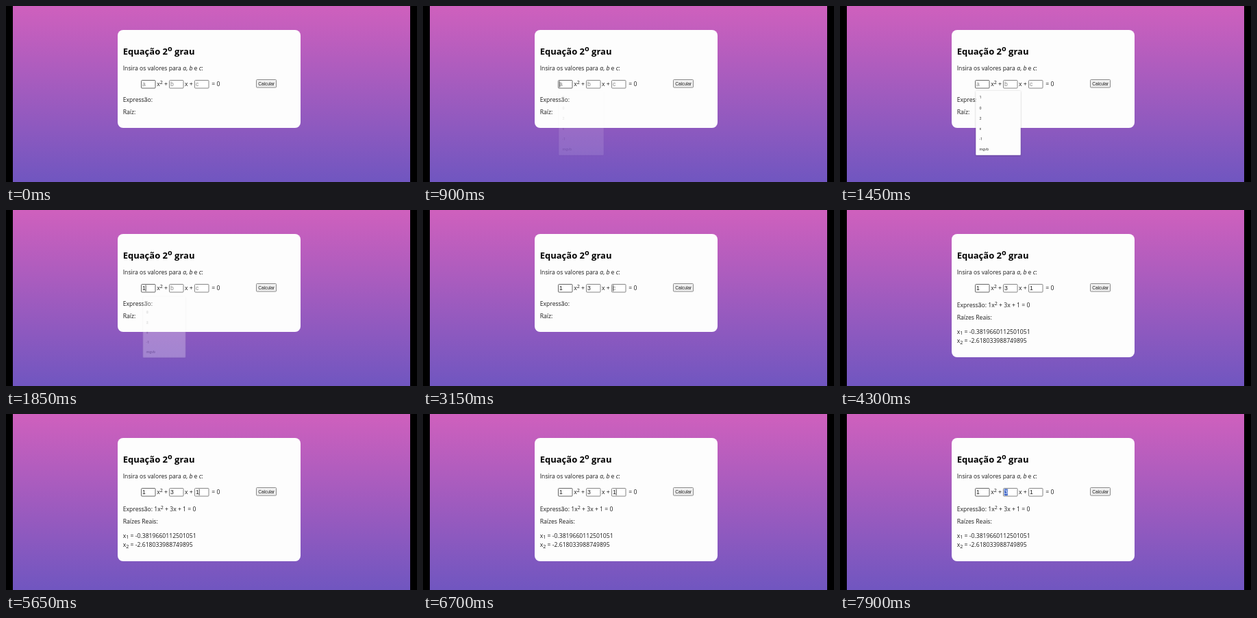
Animation, 600 px wide and 257 px high, one loop 8000 ms. Source, as an HTML page:

```html
<!DOCTYPE html>
<html lang="pt">
<head>
<meta charset="utf-8">
<title>Equação 2º grau</title>
<style>
html, body { margin: 0; width: 100%; height: 100%; overflow: hidden; background: #000; }
svg { display: block; width: 600px; height: 257px; }
text { font: 8.65px "Open Sans", "Noto Sans", sans-serif; fill: #1c1c1c; white-space: pre; }
.title { font-size: 13px; font-weight: 700; fill: #000; }
.sup { font-size: .833em; }
.i { font-style: italic; }
.field rect { fill: #fff; stroke: #858585; stroke-width: 1; }
.field text { font: 8.6px "Liberation Sans", Arial, sans-serif; }
.field .hint { fill: #858585; }
.btn { font: 6.5px "Liberation Sans", Arial, sans-serif; }
.menu text { font: 5.4px Roboto, sans-serif; fill: #333; }

/* Timeline: 8 s, hard cuts unless eased */
.show, .hide, .card, .caret, .sel { animation: 8s step-end infinite; }
.a { --d: 0s; }
.show { opacity: 0; }
.show.a { animation-name: showA; }
.hide.a { animation-name: hideA; }
.show.b { animation-name: showB; }
.hide.b { animation-name: hideB; }
.show.c { animation-name: showC; }
.hide.c { animation-name: hideC; }
.show.r { animation-name: showR; }
.hide.r { animation-name: hideR; }
.sel { opacity: 0; animation-name: select; }
.card { animation-name: grow; }
.caret { animation-name: caret; }
.menu { opacity: 0; transform-origin: 231px 171px; animation: menu 8s linear infinite; }

@keyframes showA { 0% { opacity: 0 } 21.8%, 100% { opacity: 1 } }
@keyframes hideA { 0% { opacity: 1 } 21.8%, 100% { opacity: 0 } }
@keyframes showB { 0% { opacity: 0 } 33.05%, 100% { opacity: 1 } }
@keyframes hideB { 0% { opacity: 1 } 33.05%, 100% { opacity: 0 } }
@keyframes showC { 0% { opacity: 0 } 43.7%, 100% { opacity: 1 } }
@keyframes hideC { 0% { opacity: 1 } 43.7%, 100% { opacity: 0 } }
@keyframes showR { 0% { opacity: 0 } 53.7%, 100% { opacity: 1 } }
@keyframes hideR { 0% { opacity: 1 } 53.7%, 100% { opacity: 0 } }
@keyframes select { 0% { opacity: 0 } 98.05%, 100% { opacity: 1 } }
@keyframes grow { 0% { height: 143px } 53.7%, 100% { height: 180px } }
@keyframes menu {
  0%, 11.1% { opacity: 0; transform: none }
  12.5%, 21.8% { opacity: 1; transform: none }
  23.1% { opacity: .28; transform: scale(.95) }
  25%, 100% { opacity: 0; transform: scale(.93) }
}
@keyframes caret {
  0% { opacity: 0; transform: translateX(199px) }
  11.2% { opacity: 1; transform: translateX(199px) }
  18.05% { opacity: 0; transform: translateX(199px) }
  21.8% { opacity: 1; transform: translateX(203.6px) }
  28.05% { opacity: 0; transform: translateX(203.6px) }
  30.55% { opacity: 1; transform: translateX(240px) }
  33.05% { opacity: 1; transform: translateX(244.8px) }
  39.3% { opacity: 1; transform: translateX(277px) }
  43.7% { opacity: 1; transform: translateX(281.6px) }
  50.55% { opacity: 0; transform: translateX(281.6px) }
  56.8% { opacity: 1; transform: translateX(281.6px) }
  63.7% { opacity: 0; transform: translateX(281.6px) }
  70.55% { opacity: 1; transform: translateX(281.6px) }
  76.8% { opacity: 0; transform: translateX(281.6px) }
  83.7% { opacity: 1; transform: translateX(281.6px) }
  89.3%, 100% { opacity: 0; transform: translateX(281.6px) }
}
</style>
</head>
<body>
<svg viewBox="0 0 600 257">
  <defs>
    <linearGradient id="sky" x2="0" y2="1">
      <stop offset="0" stop-color="#cf60bd"/>
      <stop offset="1" stop-color="#7056c0"/>
    </linearGradient>
    <filter id="shadow" x="-10%" y="-10%" width="120%" height="120%">
      <feDropShadow dx="0" dy=".5" stdDeviation=".8" flood-opacity=".28"/>
    </filter>
  </defs>
  <rect width="600" height="257"/>
  <rect x="10" width="580" height="257" fill="url(#sky)"/>
  <rect class="card" x="163" y="35" width="267" height="143" rx="8" fill="#fdfdfd"/>

  <text class="title" x="170.7" y="70.6">Equação 2<tspan class="sup" dy="-4.6">o</tspan><tspan dy="4.6"> grau</tspan></text>
  <text x="170.7" y="94.3">Insira os valores para <tspan class="i">a</tspan>, <tspan class="i">b</tspan> e <tspan class="i">c</tspan>:</text>

  <g class="field">
    <rect x="197.5" y="108.5" width="20.5" height="11.5" rx="1" style="stroke:#666"/>
    <text class="hint hide a" x="199" y="117">a</text>
    <text class="show a" x="199" y="117">1</text>
  </g>
  <text x="220.2" y="117">x<tspan class="sup" dy="-3.2">2</tspan><tspan dy="3.2"> +</tspan></text>
  <g class="field">
    <rect x="238.5" y="108.5" width="20.5" height="11.5" rx="1"/>
    <text class="hint hide b" x="240" y="117">b</text>
    <text class="show b" x="240" y="117">3</text>
    <g class="sel">
      <rect x="239.8" y="109.5" width="5" height="9.5" style="fill:#3a63c8;stroke:none"/>
      <text x="240" y="117" style="fill:#fff">3</text>
    </g>
  </g>
  <text x="261" y="117">x +</text>
  <g class="field">
    <rect x="275.5" y="108.5" width="20.5" height="11.5" rx="1"/>
    <text class="hint hide c" x="277" y="117">c</text>
    <text class="show c" x="277" y="117">1</text>
  </g>
  <text x="300.3" y="117">= 0</text>
  <rect class="caret" y="109.5" width=".8" height="9.3" fill="#222"/>

  <rect x="365.5" y="107.5" width="29" height="11.5" rx="1" fill="#efefef" stroke="#8c8c8c"/>
  <text class="btn" x="368.2" y="115.5">Calcular</text>

  <g class="hide r">
    <text x="170.7" y="140">Expressão:</text>
    <text x="170.7" y="157.8">Raíz:</text>
  </g>
  <g class="show r">
    <text x="170.7" y="142.2">Expressão: 1x<tspan class="sup" dy="-3.2">2</tspan><tspan dy="3.2"> + 3x + 1 = 0</tspan></text>
    <text x="170.7" y="160">Raízes Reais:</text>
    <text x="170.7" y="180.6">x<tspan class="sup" dy="1.8">1</tspan><tspan dy="-1.8"> = -0.3819660112501051</tspan></text>
    <text x="170.7" y="194">x<tspan class="sup" dy="1.8">2</tspan><tspan dy="-1.8"> = -2.618033988749895</tspan></text>
  </g>

  <g class="menu">
    <rect x="198.3" y="124" width="65.4" height="93.7" rx="1" fill="#fdfdfd" filter="url(#shadow)"/>
    <text x="203.6" y="135.4">1</text>
    <text x="203.6" y="150.5">0</text>
    <text x="203.6" y="165.6">2</text>
    <text x="203.6" y="180.7">x</text>
    <text x="203.6" y="195.8">-1</text>
    <text x="203.6" y="210.9">mgvb</text>
  </g>
</svg>
</body>
</html>
```
